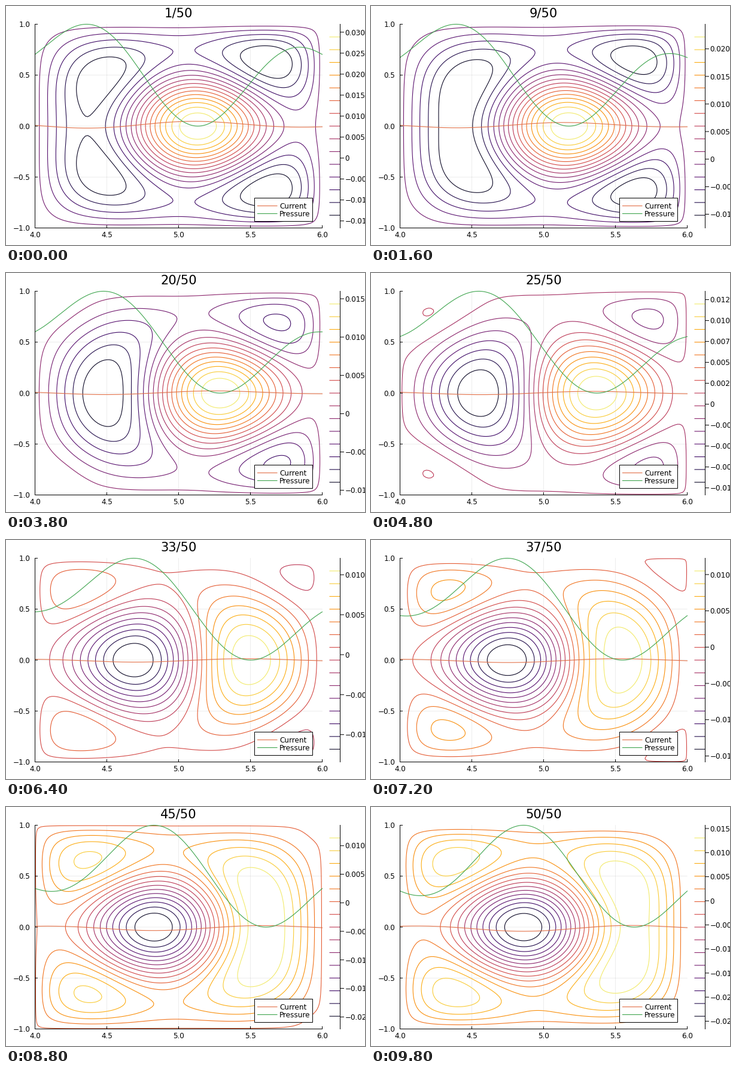
Animation, 600 px wide and 400 px high, one loop 10000 ms. Source, as a matplotlib script:

```python
import numpy as np
import matplotlib.pyplot as plt
from matplotlib.animation import FuncAnimation
from matplotlib.patches import Rectangle

W, H, DPI = 600, 400, 100
FRAMES, STEP = 50, 200
PX = 72 / DPI                        # one pixel in points
L, R, T, B = 48.5, 528.5, 30.5, 371.5
ORANGE, GREEN = "#e26f46", "#3da44d"
CMAP = plt.get_cmap("inferno")

# Linear Grad-Shafranov equation on 4<r<6, |z|<1, flux zero on the wall:
#   -D*psi = KAPPA psi + P (R2 - r^2)
# With psi = v sqrt(r/5) it becomes
#   -lap v + 3/(4 r^2) v = KAPPA v + source sqrt(5/r)
KAPPA = 24.357
P = 0.01113
R2_START, R2_STEP = 24.195, 0.029804

n = np.arange(1, 27)
m = np.arange(1, 46, 2)
s = np.linspace(0, 1, 2001)
q = 4 + 2 * s
basis = np.sin(np.pi * np.outer(n, s))
weight = 2 * (s[1] - s[0])
y_coeffs = 4 / (np.pi * m) * (-1.0) ** ((m - 1) // 2)
coupling = weight * (basis * 0.75 / q ** 2) @ basis.T


def response(source, rr, zz):
    """Flux driven by a radial source, on the grid zz by rr."""
    fx = weight * basis @ (source * np.sqrt(5 / q))
    c = [np.linalg.solve(np.diag(np.pi ** 2 / 4 * (n ** 2 + mode ** 2) - KAPPA)
                         + coupling, fx * amp)
         for mode, amp in zip(m, y_coeffs)]
    sx = np.sin(np.pi * np.outer(n, (rr - 4) / 2)) * np.sqrt(rr / 5)
    cy = np.cos(np.pi / 2 * np.outer(m, zz))
    return cy.T @ np.array(c) @ sx


r = np.linspace(4, 6, 121)
z = np.linspace(-1, 1, 121)
r_mid = np.linspace(4, 6, 301)
SOURCES = np.ones_like(q), q ** 2 - 25
FLAT, BOWL = (response(f, r, z) for f in SOURCES)
FLAT_MID, BOWL_MID = (response(f, r_mid, np.zeros(1))[0] for f in SOURCES)


def px(x):
    return L + (np.asarray(x) - 4) / 2 * (R - L)


def py(y):
    return B + (np.asarray(y) + 1) / 2 * (T - B)


plt.rcParams["font.family"] = "DejaVu Sans"
plt.rcParams["path.snap"] = False
fig = plt.figure(figsize=(W / DPI, H / DPI), dpi=DPI, facecolor="white")
ax = fig.add_axes([0, 0, 1, 1])
ax.set_xlim(0, W)
ax.set_ylim(H, 0)
ax.axis("off")


def line(xs, ys, color="black", width=1.0, **kw):
    return ax.plot(xs, ys, color=color, lw=width * PX, **kw)[0]


def label(x, y, text, ha="center", size=12, **kw):
    return ax.text(x, y, text, ha=ha, va="baseline", fontsize=size * PX, **kw)


def signed(v, digits):
    return f"{v:.{digits}f}".replace("-", "\u2212")


# Grid, axes and tick labels
for v in (4, 4.5, 5, 5.5, 6):
    x = float(px(v))
    if 4 < v < 6:
        line([x, x], [T, B], width=0.7, alpha=0.1, zorder=1)
    line([x, x], [B, B - 4], zorder=6)
    label(x, 387, f"{v:.1f}")
for v in (-1, -0.5, 0, 0.5, 1):
    y = float(py(v))
    if abs(v) < 1:
        line([L, R], [y, y], width=0.7, alpha=0.1, zorder=1)
    line([L, L + 4], [y, y], zorder=6)
    label(40.5, y + 4.5, signed(v, 1), ha="right")
line([L, L, R], [T, B, B], zorder=6)
line([558.5, 558.5], [T, B], zorder=6)

# Curves
current = line([], [], ORANGE, 1.1, zorder=4)
pressure = line([], [], GREEN, 1.1, zorder=4)
title = label(288.5, 18.2, "", size=21)

# Legend
ax.add_patch(Rectangle((415.5, 321.5), 97, 39, fc="white", ec="black",
                       lw=PX, zorder=7))
for y, color, text in ((334.5, ORANGE, "Current"), (347.5, GREEN, "Pressure")):
    line([420.5, 453], [y, y], color, 1.1, zorder=8)
    label(457, y + 4.5, text, ha="left", zorder=8)

moving = []


def draw_colorbar(lo, hi, levels, colors):
    def bar_y(v):
        return B + (v - lo) / (hi - lo) * (T - B)

    moving.append(ax.hlines(bar_y(levels), 540.5, 558.5, colors=colors,
                            lw=1.1 * PX, zorder=3))
    step, digits = (0.0025, 4) if hi - lo < 0.025 else (0.005, 3)
    for k in range(int(np.ceil(lo / step)), int(np.floor(hi / step)) + 1):
        y = bar_y(k * step)
        moving.append(line([558.5, 564.5], [y, y], zorder=6))
        text = signed(k * step, digits) if k else "0"
        moving.append(label(566.5, y + 4.7, text, ha="left"))


def update(i):
    while moving:
        moving.pop().remove()
    r2 = R2_START + R2_STEP * i
    psi = P * ((r2 - 25) * FLAT - BOWL)
    mid = P * ((r2 - 25) * FLAT_MID - BOWL_MID)

    lo, hi = psi.min(), psi.max()
    levels = np.linspace(lo, hi, 17)[1:-1]
    colors = CMAP(np.arange(1, 16) / 16)
    moving.append(ax.contour(px(r), py(z), psi, levels=levels, colors=colors,
                             linewidths=1.1 * PX, linestyles="solid",
                             zorder=3))
    draw_colorbar(lo, hi, levels, colors)

    amps = (KAPPA * mid + P * (r2 - r_mid ** 2)) / (np.pi * r_mid)
    current.set_data(px(r_mid), py(amps))
    pressure.set_data(px(r_mid), py((mid.max() - mid) / np.ptp(mid)))
    title.set_text(f"{i + 1}/{FRAMES}")
    ax.set_xlim(0, W)
    ax.set_ylim(H, 0)
    return []


anim = FuncAnimation(fig, update, frames=FRAMES, interval=STEP,
                     init_func=lambda: update(0), repeat=True, repeat_delay=0)
plt.show()
```
